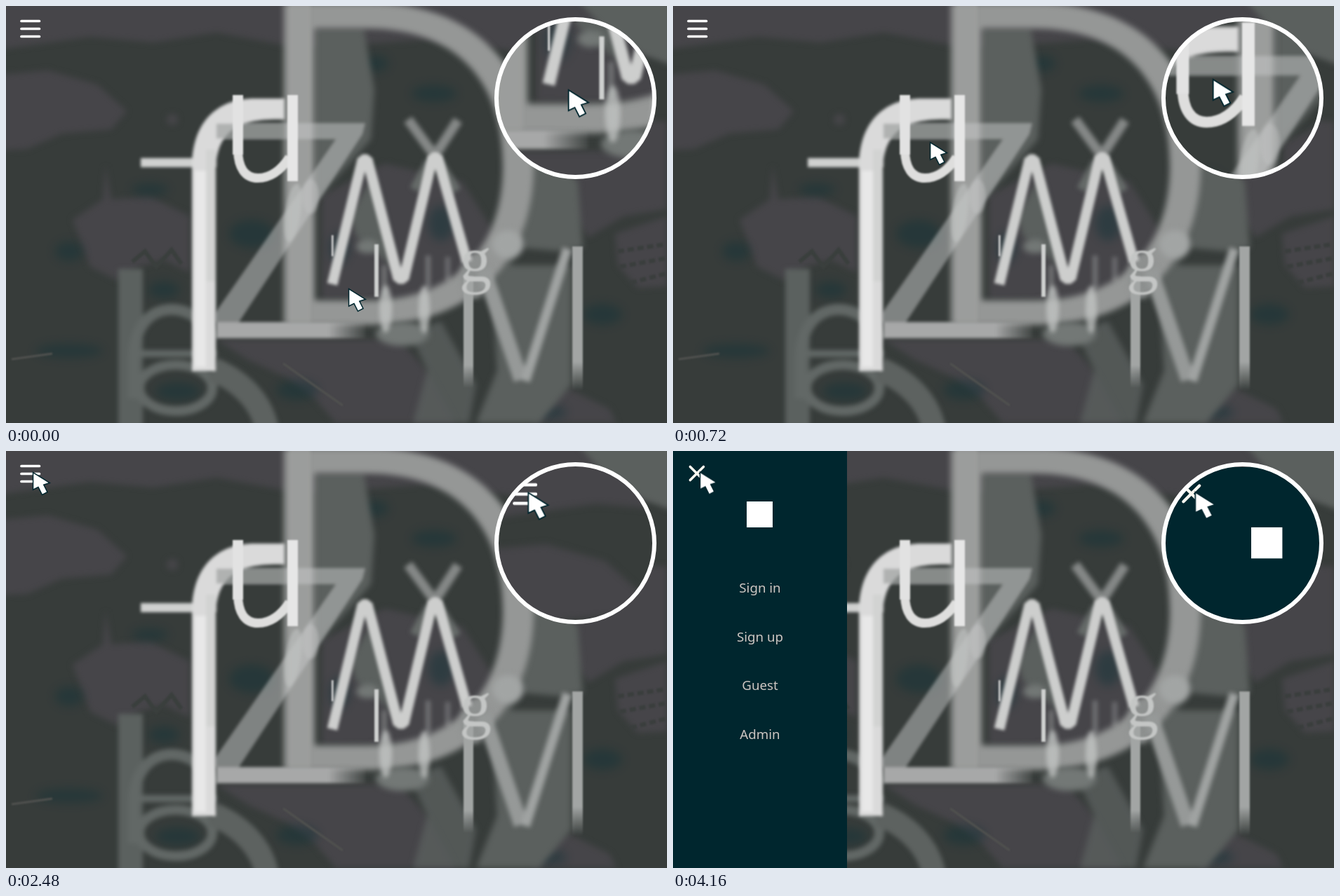
An HTML page for the animation above (4680 ms loop, 942 by 595 pixels).

```html
<!DOCTYPE html>
<html lang="en">
<head>
<meta charset="utf-8">
<title>Menu with magnifier</title>
<style>
  html, body { margin: 0; width: 100%; height: 100%; overflow: hidden; background: #363b39; }
  .stage, .scene, .lens, .view { position: absolute; left: 0; top: 0; width: 942px; height: 595px; }
  .stage, .scene { overflow: hidden; }
  .scene > * { position: absolute; left: 0; top: 0; }

  .b1 { filter: blur(1px); }
  .b2 { filter: blur(2px); }
  .b3 { filter: blur(3px); }
  .b4 { filter: blur(4px); }
  .b7 { filter: blur(7px); }
  .line { fill: none; }

  .panel { width: 248px; height: 595px; background: #00262e; }
  .panel svg { position: absolute; left: 0; top: 0; }
  .logo { position: absolute; left: 105px; top: 72px; width: 37px; height: 37px; background: #fff; }
  .panel span {
    position: absolute; left: 0; width: 248px; text-align: center; color: #cdc6c2;
    font: 18.7px/26px "Noto Sans", "Open Sans", sans-serif;
  }

  .cursor, .cursor svg { width: 30px; height: 40px; overflow: visible; }
  .arrow { fill: #fff; stroke: #00262e; stroke-width: 3; paint-order: stroke; }
  .ring { fill: none; stroke: #c8aa9c; stroke-width: 2; }

  .lens { clip-path: circle(114px at 811.5px 131px); }
  .view { transform-origin: 0 0; }
  .rim {
    position: absolute; left: 696px; top: 15.5px; width: 219px; height: 219px;
    border: 6px solid #fff; border-radius: 50%;
  }

  .cursor, .view, .panel, .ring { animation: 4680ms linear infinite paused; }
  .cursor { animation-name: point; }
  .view { animation-name: follow; }
  .panel { animation-name: slide; }
  .ring { animation-name: press; }

  @keyframes point {
    0% { transform: translate(488px, 403px); }
    5.128% { transform: translate(486px, 363px); }
    11.966% { transform: translate(420px, 251px); }
    15.385% { transform: translate(366px, 194px); }
    23.932% { transform: translate(170px, 96px); }
    24.786% { transform: translate(158px, 89px); }
    34.188%, 52.98% { transform: translate(36px, 30px); }
    52.99%, 64.957% { transform: translate(38px, 30px); }
    72.65%, 82.051% { transform: translate(39px, 31.5px); }
    88.888%, 100% { transform: translate(38px, 29.5px); }
  }
  @keyframes follow {
    0% { transform: translate(215.4px, -364.6px) scale(1.2); }
    5.128% { transform: translate(229.8px, -307.6px) scale(1.2); }
    15.385% { transform: translate(329.8px, -128.8px) scale(1.2); }
    24.786% { transform: translate(618.4px, 14.2px) scale(1.2); }
    29.808%, 100% { transform: translate(698px, 22.5px) scale(1.2); }
  }
  @keyframes slide {
    0%, 78.12% { transform: translateX(-248px); animation-timing-function: ease-in-out; }
    88.888%, 100% { transform: none; }
  }
  @keyframes press {
    0%, 52.991% { r: 0; opacity: 0; }
    55% { r: 5px; opacity: .55; }
    64.957% { r: 18px; opacity: .55; }
    73% { r: 23px; opacity: .55; }
    82.051% { r: 19.5px; opacity: .5; }
    88.034%, 100% { r: 17px; opacity: 0; }
  }
</style>
</head>
<body>
<div class="stage">
  <div class="scene">
    <svg width="942" height="595" viewBox="0 0 942 595">
      <defs>
        <linearGradient id="fade" x1="0" y1="0" x2="0" y2="1">
          <stop offset=".8" stop-color="#a2a5a4"/>
          <stop offset="1" stop-color="#a2a5a4" stop-opacity="0"/>
        </linearGradient>
        <linearGradient id="fadeX">
          <stop offset=".75" stop-color="#a7a8a8"/>
          <stop offset="1" stop-color="#a7a8a8" stop-opacity=".1"/>
        </linearGradient>
      </defs>
      <rect width="942" height="595" fill="#373c3a"/>

      <!-- ground -->
      <g class="b4" fill="#464549">
        <path d="M-9-9H950V75L850 58 740 66 600 48 420 60 300 38 210 52 120 44-9 62Z"/>
        <path d="M-9 98 60 92 130 112 172 150 150 176 80 182 30 204-9 206Z"/>
        <path d="M95 305 138 276 142 228 150 276 205 272 262 300 262 380 225 362 190 372 160 392 120 372Z"/>
        <path d="M450 270 540 225 650 250 700 330 690 400 640 420 450 418Z"/>
        <path d="M300 476H560L600 520 640 595H470L440 560 400 530 345 505Z"/>
        <path d="M740 150 942 165V290L880 300 830 330 770 250Z"/>
        <path d="M868 325 942 300V400L900 402 872 370Z"/>
        <path d="M750 560 800 545 860 575 870 595H750Z"/>
        <circle cx="237" cy="162" r="8"/>
      </g>
      <g class="b7" fill="#123238" opacity=".45">
        <ellipse cx="525" cy="82" rx="20" ry="12"/>
        <ellipse cx="610" cy="125" rx="32" ry="12"/>
        <ellipse cx="205" cy="262" rx="26" ry="9"/>
        <ellipse cx="350" cy="325" rx="32" ry="20"/>
        <ellipse cx="90" cy="350" rx="20" ry="14"/>
        <ellipse cx="225" cy="405" rx="22" ry="12"/>
        <ellipse cx="90" cy="492" rx="48" ry="10"/>
        <ellipse cx="245" cy="550" rx="32" ry="13"/>
        <ellipse cx="415" cy="548" rx="30" ry="14"/>
        <ellipse cx="775" cy="580" rx="24" ry="10"/>
        <ellipse cx="850" cy="440" rx="28" ry="15"/>
        <ellipse cx="620" cy="310" rx="18" ry="25"/>
        <ellipse cx="475" cy="345" rx="14" ry="22"/>
      </g>
      <g class="b4" fill="#5b605e">
        <path d="M440 32H510L525 120 520 190 440 280Z"/>
        <path d="M815-9H950V85L905 68 850 30Z"/>
        <path d="M745 190 815 250 822 345 790 350 735 345 705 390 690 360Z"/>
        <path d="M490 300 525 240 560 380 500 330Z"/>
        <path d="M575 465 620 450 670 540 660 595H580L600 520Z" opacity=".8"/>
        <path d="M690 370H806V540L760 595H670L700 520Z"/>
      </g>
      <g class="b1 line" stroke="#50514f" stroke-width="3">
        <path d="M8 504 66 496M395 510 480 570"/>
        <path d="M180 365 198 350 214 372 236 348 250 368" stroke="#3a3f3d" stroke-width="6"/>
        <path d="M872 350 940 340M875 372 940 360M890 395 940 382" stroke="#3a3e3d" stroke-width="6" stroke-dasharray="9 5"/>
      </g>

      <!-- letters -->
      <g class="b3">
        <rect x="160" y="375" width="35" height="240" fill="#5b615f"/>
        <g class="line" stroke="#626866">
          <path d="M294 475C275 420 185 410 182 500V560" stroke-width="16"/>
          <path d="M180 496H300" stroke-width="10"/>
          <ellipse cx="242" cy="545" rx="52" ry="33" stroke-width="14"/>
          <path d="M294 518C335 535 365 565 372 605" stroke-width="34" stroke="#5d6260"/>
        </g>
      </g>
      <path class="b4" fill="#959796" fill-rule="evenodd" d="M396-4H520C665-4 752 85 752 228C752 368 660 455 520 455H396ZM440 32H515C640 32 708 105 708 228C708 345 640 420 515 420H440Z"/>
      <g class="b2">
        <rect x="404" y="-4" width="30" height="454" fill="#a0a2a1" opacity=".6"/>
        <path d="M296 167H512L508 183 332 451H298V438L470 190H296Z" fill="#c8cac9" opacity=".5"/>
        <rect x="300" y="451" width="212" height="23" fill="url(#fadeX)"/>
        <ellipse cx="409" cy="295" rx="11" ry="42" fill="#c4c6c5" opacity=".55" transform="rotate(8 409 295)"/>
        <ellipse cx="434" cy="272" rx="12" ry="25" fill="#c0c2c1" opacity=".5"/>
      </g>
      <g class="b4" fill="#737876">
        <ellipse cx="715" cy="340" rx="22" ry="20" fill="#a2a5a4"/>
        <ellipse cx="565" cy="468" rx="38" ry="17"/>
        <ellipse cx="515" cy="343" rx="16" ry="10"/>
        <ellipse cx="668" cy="385" rx="20" ry="32" fill="#8d908f"/>
      </g>
      <g class="b3">
        <g class="line" stroke="#858887" stroke-width="14">
          <path d="M573 162 611 214 644 163"/>
          <path d="M604 222 582 262M616 222 642 264" stroke="#666b69"/>
        </g>
        <g fill="#c4c7c6">
          <ellipse cx="541" cy="432" rx="9" ry="34" opacity=".75"/>
          <ellipse cx="596" cy="433" rx="8" ry="34" opacity=".75"/>
          <rect x="536" y="370" width="6" height="45" opacity=".4"/>
          <rect x="598" y="356" width="7" height="48" opacity=".35"/>
          <rect x="626" y="358" width="7" height="35" opacity=".3"/>
        </g>
        <path d="M680 375 734 533" class="line" stroke="#969998" stroke-width="21"/>
        <path d="M800 346 740 535" class="line" stroke="#a0a3a2" stroke-width="14"/>
      </g>
      <path d="M465 397 508 219H515L559 389H567L608 216H615L657 365" class="b2 line" stroke="#cdcecd" stroke-width="15" stroke-linejoin="bevel"/>
      <g class="b1">
        <rect x="652" y="385" width="14" height="160" fill="url(#fade)"/>
        <rect x="807" y="343" width="15" height="206" fill="url(#fade)"/>
        <rect x="464" y="327" width="2.5" height="30" fill="#ddd"/>
        <rect x="525" y="340" width="6" height="75" fill="#cfd1d0"/>
        <text x="646" y="393" font-size="92" fill="#c4c6c5" font-family="Liberation Serif, serif">g</text>
      </g>
      <g class="b2">
        <rect x="192" y="217" width="108" height="13" fill="#d0d1d0"/>
        <path d="M265 521V230C265 168 298 132 355 132H397V162C335 160 300 175 299 235V521Z" fill="#dadada"/>
        <rect x="269" y="235" width="16" height="280" fill="#e8e8e8"/>
        <rect x="285" y="205" width="14" height="188" fill="#d2d3d2"/>
        <rect x="300" y="168" width="96" height="21" fill="#8f9291" opacity=".55"/>
      </g>
      <g class="b1">
        <path d="M330.5 127V206C331 231 341 245.500 359 245.500C378 245.500 392 234 404 216" class="line" stroke="#dededd" stroke-width="13"/>
        <rect x="323" y="127" width="15" height="85" fill="#e2e2e2"/>
        <rect x="401" y="127" width="15" height="123" fill="#e6e6e6"/>
      </g>

      <path d="M22 21.500H47.500M22 32.500H47.500M22 43.500H47.500" stroke="#fff" stroke-width="3.700" stroke-linecap="round"/>
    </svg>

    <div class="panel">
      <svg width="60" height="60"><path d="M24.500 22.500 43.500 41.500M43.500 22.500 24.500 41.500" stroke="#fbf8f0" stroke-width="3.600" stroke-linecap="round"/></svg>
      <div class="logo"></div>
      <span style="top:182px">Sign in</span>
      <span style="top:252px">Sign up</span>
      <span style="top:321px">Guest</span>
      <span style="top:391px">Admin</span>
    </div>

    <div class="cursor">
      <svg>
        <circle class="ring" cx="3.3" cy="4.5"/>
        <path class="arrow" d="M1.300 2V24L8.300 20.600 13.800 31.500 20 28.300 14.700 17.800 22.500 15.300Z"/>
      </svg>
    </div>
  </div>

  <div class="lens"><div class="view"></div></div>
  <div class="rim"></div>
</div>

<script>
  const LOOP = 4680, STEP = 40;
  const scene = document.querySelector('.scene');
  document.querySelector('.view').append(scene.cloneNode(true));
  const moves = document.getAnimations();

  // The picture advances at 25 steps per second.
  function tick(now) {
    const t = Math.floor((now % LOOP) / STEP) * STEP;
    for (const m of moves) m.currentTime = t;
    requestAnimationFrame(tick);
  }
  requestAnimationFrame(tick);
</script>
</body>
</html>
```
